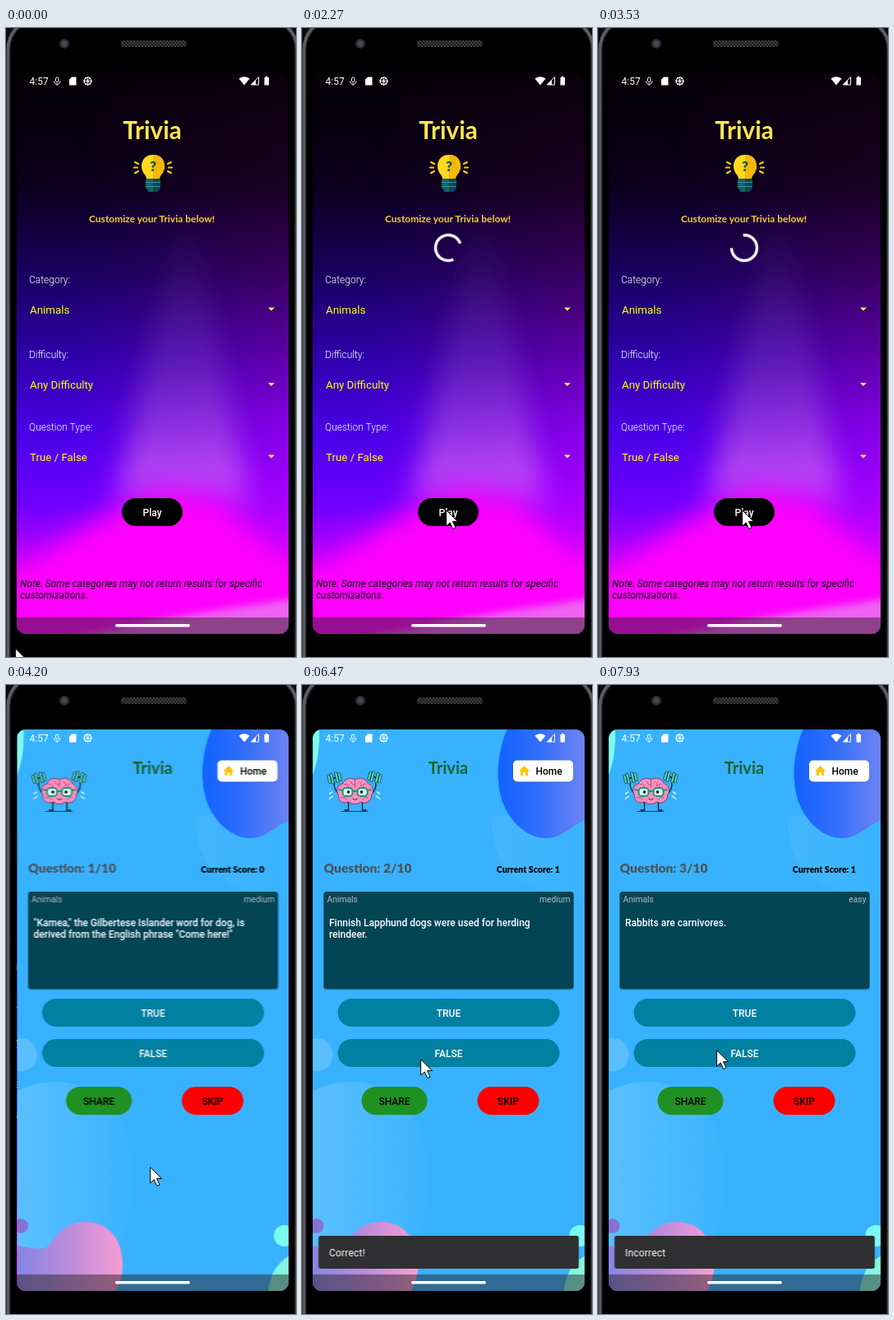
Write an HTML page that moves like this. It is 353 px wide and 764 px high and loops after 8 s.

```html
<!DOCTYPE html>
<html lang="en">
<head>
<meta charset="utf-8">
<title>Trivia</title>
<style>
html, body { margin: 0; width: 100%; height: 100%; overflow: hidden; background: #000; }
svg { display: block; width: 100vw; height: 100vh; }
text { font: 12px Roboto, sans-serif; fill: #fff; }
.fun { font-family: Lato, sans-serif; font-weight: 900; }
.label { font-weight: 300; }
.value { font-size: 13.3px; fill: #ff0; }
.note { font-style: italic; fill: #000; }
.btn { font-weight: 500; text-anchor: middle; }
.dark { fill: #000; }
.small { font-size: 10.3px; fill: #b3bcbf; }
.body { font-weight: 500; }
.end { text-anchor: end; }
.count { font-size: 15.5px; fill: #4b545b; }
.score { font-size: 10.6px; fill: #000; text-anchor: end; }

@property --a { syntax: "<number>"; inherits: true; initial-value: 0; }
@property --b { syntax: "<number>"; inherits: true; initial-value: 0; }

.anim { animation: 8s linear infinite; }
.step { animation: 8s step-end infinite; }

#cursor { animation-name: cursor; }
@keyframes cursor {
  0%, .875% { transform: translate(11px, 753px); animation-timing-function: ease-in-out; }
  4.125%, 10.875% { transform: translate(188px, 567px); animation-timing-function: ease-in-out; }
  15%, 56.6% { transform: translate(175px, 585px); animation-timing-function: ease-in-out; }
  61.6%, 80% { transform: translate(145px, 448px); }
  80.875%, 85% { transform: translate(144px, 454px); }
  86.2%, 100% { transform: translate(144px, 443px); }
}

/* page change: fast start, very slow finish */
#setup { animation-name: leave; }
@keyframes leave {
  0%, 48.625% { transform: none; animation-timing-function: cubic-bezier(.3, 0, .8, .15); }
  49.56% { transform: translateX(-13.2px); animation-timing-function: cubic-bezier(.05, .7, .1, 1); }
  54.25%, 100% { transform: translateX(-33px); }
}
#quiz { animation-name: enter, fade; }
@keyframes enter {
  0%, 48.625% { transform: translateX(33px); animation-timing-function: cubic-bezier(.3, 0, .8, .15); }
  49.56% { transform: translateX(19.8px); animation-timing-function: cubic-bezier(.05, .7, .1, 1); }
  54.25%, 100% { transform: none; }
}
@keyframes fade { 0%, 49.25% { opacity: 0; } 50.3%, 100% { opacity: 1; } }

/* spinner: the ring turns while head and tail chase each other */
#ring { transform-origin: 178px 267px; animation-name: turn; }
@keyframes turn {
  0%, 19.875% { transform: rotate(0deg); }
  44.125%, 100% { transform: rotate(445.2deg); }
}
#arc {
  fill: none; stroke: #fff; stroke-width: 3.4;
  stroke-dasharray: calc((var(--b) - var(--a) + 4) * 1px) calc((96 - var(--b) + var(--a)) * 1px);
  stroke-dashoffset: calc(var(--a) * -1px);
  animation-name: head, tail, spin;
}
@keyframes head {
  0%, 19.875% { --b: 0; animation-timing-function: cubic-bezier(.4, 0, .2, 1.04); }
  28.2% { --b: 72; animation-timing-function: cubic-bezier(.932, 0, .986, 1); }
  36.54% { --b: 75; animation-timing-function: cubic-bezier(.4, 0, .2, 1.04); }
  44.125%, 100% { --b: 147; }
}
@keyframes tail {
  0%, 28.2% { --a: 0; animation-timing-function: cubic-bezier(.4, 0, .2, 1); }
  36.54%, 100% { --a: 75; }
}
@keyframes spin {
  0% { opacity: 0; animation-timing-function: step-end; }
  19.875%, 100% { opacity: 1; }
}

.ripple { fill: #fff; transform-box: fill-box; transform-origin: center; }
#tapPlay { animation-name: tapPlay; }
@keyframes tapPlay {
  0%, 19.1% { opacity: 0; transform: scale(.3); }
  21.2%, 23.2% { opacity: .2; transform: none; }
  28.7%, 100% { opacity: 0; transform: none; }
}
#tapFalse { animation-name: tapFalse; }
@keyframes tapFalse {
  0%, 62.5% { opacity: 0; transform: scale(.1); }
  64%, 65% { opacity: .2; transform: none; }
  67.5% { opacity: 0; transform: none; }
  67.6%, 86.9% { opacity: 0; transform: scale(.1); }
  88.4%, 89.5% { opacity: .2; transform: none; }
  92%, 100% { opacity: 0; transform: none; }
}

#snack { transform-box: fill-box; transform-origin: center; animation-name: snack; }
@keyframes snack {
  0%, 68% { opacity: 0; transform: scale(.8); animation-timing-function: ease-out; }
  69.9%, 91.25% { opacity: 1; transform: none; }
  92.1% { opacity: 0; transform: none; }
  92.2% { opacity: 0; transform: scale(.8); animation-timing-function: ease-out; }
  94.06%, 100% { opacity: 1; transform: none; }
}

#q1 { animation-name: q1; }
#q2 { animation-name: q2; }
#q3 { animation-name: q3; }
#s0 { animation-name: s0; }
#s1 { animation-name: s1; }
#right { animation-name: right; }
#wrong { animation-name: wrong; }
@keyframes q1 { 0% { opacity: 1; } 73.4%, 100% { opacity: 0; } }
@keyframes q2 { 0% { opacity: 0; } 73.4% { opacity: 1; } 96.7%, 100% { opacity: 0; } }
@keyframes q3 { 0% { opacity: 0; } 96.7%, 100% { opacity: 1; } }
@keyframes s0 { 0% { opacity: 1; } 68%, 100% { opacity: 0; } }
@keyframes s1 { 0% { opacity: 0; } 68%, 100% { opacity: 1; } }
@keyframes right { 0% { opacity: 1; } 92.15%, 100% { opacity: 0; } }
@keyframes wrong { 0% { opacity: 0; } 92.15%, 100% { opacity: 1; } }
</style>
</head>
<body>
<svg viewBox="0 0 353 764" preserveAspectRatio="none">
<defs>
  <clipPath id="screen"><rect x="13" y="54" width="331" height="682" rx="11"/></clipPath>
  <clipPath id="playClip"><rect x="141" y="571" width="74" height="34" rx="17"/></clipPath>
  <clipPath id="falseClip"><rect x="44" y="430" width="270" height="34" rx="17"/></clipPath>
  <linearGradient id="west" x1="0" y1="0" x2="0" y2="1">
    <stop offset="0" stop-color="#050006"/><stop offset=".2" stop-color="#0a001c"/>
    <stop offset=".36" stop-color="#1a0060"/><stop offset=".5" stop-color="#2e00a8"/>
    <stop offset=".65" stop-color="#4c00ea"/><stop offset=".77" stop-color="#7000ff"/>
    <stop offset=".86" stop-color="#b800ff"/><stop offset=".93" stop-color="#f0f"/>
  </linearGradient>
  <linearGradient id="east" x1="0" y1="0" x2="0" y2="1">
    <stop offset="0" stop-color="#0c000b"/><stop offset=".2" stop-color="#1e0026"/>
    <stop offset=".36" stop-color="#3c0060"/><stop offset=".5" stop-color="#6400a6"/>
    <stop offset=".62" stop-color="#8c00e0"/><stop offset=".74" stop-color="#ac00ff"/>
    <stop offset=".86" stop-color="#d400ff"/><stop offset=".94" stop-color="#f0f"/>
  </linearGradient>
  <linearGradient id="across"><stop offset=".2" stop-color="#000"/><stop offset="1" stop-color="#fff"/></linearGradient>
  <mask id="toEast" maskUnits="userSpaceOnUse" x="13" y="54" width="370" height="682"><rect x="13" y="54" width="370" height="682" fill="url(#across)"/></mask>
  <linearGradient id="ray" x1="0" y1="0" x2="0" y2="1">
    <stop offset="0" stop-color="#5a3a90" stop-opacity="0"/><stop offset=".5" stop-color="#8048c8" stop-opacity=".35"/>
    <stop offset=".88" stop-color="#cc5cf4" stop-opacity=".75"/><stop offset="1" stop-color="#f030ff" stop-opacity=".3"/>
  </linearGradient>
  <filter id="soft" filterUnits="userSpaceOnUse" x="-60" y="150" width="480" height="700"><feGaussianBlur stdDeviation="15"/></filter>
  <filter id="haze" filterUnits="userSpaceOnUse" x="-60" y="600" width="480" height="250"><feGaussianBlur stdDeviation="5"/></filter>
  <linearGradient id="blue"><stop offset="0" stop-color="#1263ff"/><stop offset=".45" stop-color="#2f6dfc"/><stop offset="1" stop-color="#6f84f4"/></linearGradient>
  <linearGradient id="pink"><stop offset="0" stop-color="#8585e6"/><stop offset=".5" stop-color="#bd8cdc"/><stop offset="1" stop-color="#f79dd4"/></linearGradient>
  <linearGradient id="pale"><stop offset="0" stop-color="#66c4ff"/><stop offset="1" stop-color="#3cb4ff"/></linearGradient>
  <linearGradient id="mint"><stop offset="0" stop-color="#7cf7ec"/><stop offset="1" stop-color="#8af5d8"/></linearGradient>
  <pattern id="mesh" width="4" height="4" patternUnits="userSpaceOnUse"><path d="M0 0L4 4M4 0L0 4" stroke="#444449" stroke-width=".8"/></pattern>
  <path id="drop" d="M0 0H8L4 4Z" fill="#ffef5a"/>
  <g id="bell" stroke="#14383c" stroke-width=".8" fill="#52dcc8">
    <path d="M-6 0H6" stroke-width="2"/>
    <rect x="-8" y="-5" width="3" height="10" rx="1"/><rect x="-4.5" y="-6.5" width="3" height="13" rx="1"/>
    <rect x="1.5" y="-6.5" width="3" height="13" rx="1"/><rect x="5" y="-5" width="3" height="10" rx="1"/>
  </g>
</defs>

<!-- phone body -->
<rect width="353" height="764" fill="#0c0c0f"/>
<rect x="2.5" y="-12" width="351.500" height="830" rx="38" fill="#000" stroke="#5d5e64" stroke-width="4"/>
<rect x="5.200" y="-9" width="346.500" height="824" rx="35" fill="#000" stroke="#1c1d20" stroke-width="1.5"/>
<circle cx="71" cy="19" r="6" fill="#2b2c33"/><circle cx="71" cy="19" r="3.2" fill="#484a58"/>
<rect x="140" y="15" width="80" height="8" rx="3" fill="#1b1b1e"/><rect x="140" y="15" width="80" height="8" rx="3" fill="url(#mesh)"/>

<g clip-path="url(#screen)">
  <g id="setup" class="anim">
    <rect x="13" y="54" width="370" height="682" fill="url(#west)"/>
    <rect x="13" y="54" width="370" height="682" fill="url(#east)" mask="url(#toEast)"/>
    <path d="M212 220H226L300 590H130Z" fill="url(#ray)" filter="url(#soft)"/>
    <path d="M-30 690L110 598L195 562L260 574L330 640L400 680V790H-30Z" fill="#f0f" filter="url(#soft)"/>
    <path d="M70 742L200 716L370 690V742Z" fill="#e3a4ea" opacity=".6" filter="url(#haze)"/>
    <text class="fun" x="178" y="135" text-anchor="middle" style="font-size:29.5px;font-weight:700;fill:#ffe556">Trivia</text>
    <g>
      <path d="M157 163l4 2M156 169.500h4M157 176l4-2M201 163l-4 2M202 169.500h-4M201 176l-4-2" stroke="#ffd21f" stroke-width="2" stroke-linecap="round"/>
      <path d="M179 154c-9 0-14 6-14 14 0 8 6 10 6 15h16c0-5 6-7 6-15 0-8-5-14-14-14Z" fill="#ffd91f"/>
      <path d="M179 154c9 0 14 6 14 14 0 8-6 10-6 15h-8Z" fill="#f5b800"/>
      <path d="M170 183h18v11l-4 5h-10l-4-5Z" fill="#15616d"/><path d="M179 183h9v11l-4 5h-5Z" fill="#0c4552"/>
      <path d="M170 187.500h18M171 192.500h16" stroke="#3c93a0"/>
      <text class="fun" x="179" y="174" text-anchor="middle" style="font-size:17px;fill:#14505c">?</text>
    </g>
    <text class="fun" x="101" y="236" style="font-weight:700;fill:#ffcd2e">Customize your Trivia below!</text>
    <g id="ring" class="anim"><circle id="arc" class="anim" cx="178" cy="267" r="15.5" pathLength="100" transform="rotate(-90 178 267)"/></g>
    <text class="label" x="28" y="310">Category:</text><text class="value" x="29" y="346.500">Animals</text><use href="#drop" x="319" y="339.5"/>
    <text class="label" x="28" y="401">Difficulty:</text><text class="value" x="29" y="438">Any Difficulty</text><use href="#drop" x="319" y="431"/>
    <text class="label" x="28" y="489">Question Type:</text><text class="value" x="29" y="525.500">True / False</text><use href="#drop" x="319" y="518.5"/>
    <rect x="141" y="571" width="74" height="34" rx="17"/>
    <text class="btn" x="178" y="592.5">Play</text>
    <g clip-path="url(#playClip)"><circle id="tapPlay" class="ripple anim" cx="178" cy="588" r="40"/></g>
    <text class="note" x="17" y="679">Note: Some categories may not return results for specific</text>
    <text class="note" x="17" y="693">customizations.</text>
  </g>

  <g id="quiz" class="anim"><g transform="translate(-.5)">
    <rect x="13" y="54" width="370" height="682" fill="#38b2ff"/>
    <path d="M232 160C228 220 262 250 346 262V150Z" fill="url(#pale)" opacity=".25"/>
    <path d="M250 54C239 80 233 118 248 150C262 177 284 187 300 186C320 184 330 169 346 164V54Z" fill="url(#blue)"/>
    <path d="M13 54H21.5C22 76 20 92 13 111Z" fill="#80fbe8"/>
    <circle cx="18" cy="449" r="20" fill="#5bbfff"/>
    <path d="M13 494C45 476 90 478 118 503C150 530 160 580 150 640C146 680 120 700 100 736H13Z" fill="url(#pale)" opacity=".75"/>
    <circle cx="18" cy="657" r="9" fill="#8673d3"/>
    <path d="M13 681C32 684 45 688 53 680C62 666 74 652 97 652C124 652 142 674 142 703C142 718 138 728 133 737H13Z" fill="url(#pink)"/>
    <circle cx="339" cy="669" r="13" fill="#7dfaf0"/>
    <path d="M319 737C321 714 332 700 346 693V737Z" fill="url(#mint)"/>

    <!-- mascot -->
    <path d="M46 133C40 128 39 122 40 117M84 133C91 128 91 122 90 117" fill="none" stroke="#14383c" stroke-width="1.6"/>
    <use href="#bell" transform="translate(40 113) rotate(-14)"/><use href="#bell" transform="translate(89 112) rotate(14)"/>
    <path d="M57 142V152H52M74 142V152H79" fill="none" stroke="#222" stroke-width="1.5"/>
    <path d="M48 153.500H81" stroke="#1a3f60" stroke-width="1"/>
    <path d="M45 134C41 128 44 121 50 120C52 113 61 112 65 115C71 111 79 114 81 120C87 122 89 129 85 134C86 141 78 145 72 142C67 146 61 145 58 142C50 145 44 141 45 134Z" fill="#f58fbd" stroke="#7a2850" stroke-width=".8"/>
    <path d="M65 115V124M52 121q4-2 5 3M60 117q1 5 5 4M70 118q4 1 2 5M78 120q-4 0-3 4M48 137q5-2 7 3M81 137q-5-2-7 3" fill="none" stroke="#c0487f"/>
    <g fill="#d8fff4" stroke="#24907f" stroke-width="2"><rect x="50" y="125" width="12" height="10" rx="4"/><rect x="68" y="125" width="12" height="10" rx="4"/><path d="M62 129H68M50 128L45 127M80 128L85 127"/></g>
    <circle cx="57" cy="130" r="1.8"/><circle cx="73" cy="130" r="1.8"/>
    <path d="M62 138q3 3 6 0" fill="none" stroke="#5b1838"/>
    <path d="M37 130l-3 2M38 135l-4 3M92 130l3 2M91 135l4 3" stroke="#e5fbff" stroke-width="1.5" stroke-linecap="round"/>

    <text class="fun" x="178.500" y="108" text-anchor="middle" style="font-size:20px;font-weight:700;fill:#176329">Trivia</text>
    <rect x="257.500" y="92.500" width="73" height="26" rx="5" fill="#1d3f88" opacity=".45"/>
    <rect x="257.500" y="91.500" width="73" height="26" rx="5" fill="#fff"/>
    <path d="M264.500 104.500L271 98L277.500 104.500H275.500V110H272.500V106H269.500V110H266.500V104.500Z" fill="#ffc400"/>
    <text class="body dark" x="285" y="108.500">Home</text>

    <g id="s0" class="step"><text class="fun score" x="314.500" y="228">Current Score: 0</text></g>
    <g id="s1" class="step"><text class="fun score" x="314.500" y="228">Current Score: 1</text></g>
    <rect x="26.500" y="251" width="305" height="119.500" rx="4" fill="#12567a" opacity=".55"/>
    <rect x="27" y="251" width="304" height="118" rx="4" fill="#034455"/>
    <text class="small" x="31" y="263.500">Animals</text>
    <g id="q1" class="step">
      <text class="fun count" x="27" y="227.500">Question: 1/10</text>
      <text class="small end" x="327" y="263.500">medium</text>
      <text class="body" x="33.500" y="293">"Kamea," the Gilbertese Islander word for dog, is</text>
      <text class="body" x="33.500" y="307">derived from the English phrase "Come here!"</text>
    </g>
    <g id="q2" class="step">
      <text class="fun count" x="27" y="227.500">Question: 2/10</text>
      <text class="small end" x="327" y="263.500">medium</text>
      <text class="body" x="33.500" y="293">Finnish Lapphund dogs were used for herding</text>
      <text class="body" x="33.500" y="307">reindeer.</text>
    </g>
    <g id="q3" class="step">
      <text class="fun count" x="27" y="227.500">Question: 3/10</text>
      <text class="small end" x="327" y="263.500">easy</text>
      <text class="body" x="33.500" y="293">Rabbits are carnivores.</text>
    </g>

    <rect x="44" y="381" width="270" height="34" rx="17" fill="#0280a2"/><text class="btn" x="179" y="402.500">TRUE</text>
    <rect x="44" y="430" width="270" height="34" rx="17" fill="#0280a2"/><text class="btn" x="179" y="452">FALSE</text>
    <g clip-path="url(#falseClip)"><circle id="tapFalse" class="ripple anim" cx="179" cy="447" r="140"/></g>
    <rect x="73" y="488" width="80" height="34" rx="17" fill="#1f9022"/><text class="btn dark" x="113" y="509.500">SHARE</text>
    <rect x="214" y="488" width="75" height="34" rx="17" fill="#f00"/><text class="btn dark" x="251.500" y="509.500">SKIP</text>

    <g id="snack" class="anim">
      <rect x="20.500" y="669" width="317" height="40" rx="3" fill="#303033"/>
      <g id="right" class="step"><text x="33.500" y="693.500" letter-spacing=".2">Correct!</text></g>
      <g id="wrong" class="step"><text x="33.500" y="693.500" letter-spacing=".2">Incorrect</text></g>
    </g>
  </g></g>

  <!-- system bars -->
  <rect x="13" y="716" width="331" height="20" fill="#281e1e" opacity=".48"/>
  <rect x="133" y="724" width="91" height="3.600" rx="1.800" fill="#fff"/>
  <text x="28.500" y="69">4:57</text>
  <g fill="#fff">
    <rect x="60.500" y="60" width="3.400" height="6" rx="1.700" fill="none" stroke="#fff"/>
    <path d="M58.500 64.500c0 5 7.400 5 7.400 0M62.200 68v2" fill="none" stroke="#fff"/>
    <path d="M80 59.500h5.500v10h-8.500v-7Z"/>
    <circle cx="99.500" cy="64.500" r="4.300" fill="none" stroke="#fff" stroke-width="1.300"/>
    <path d="M94 64.500h11M99.500 59v11M96 60l7 9M103 60l-7 9" stroke="#fff" stroke-width=".8"/>
    <path d="M283.500 61.500q6.500-5 13 0L290 69.500Z"/>
    <path d="M298.500 69L307.500 59.500V69Z" fill="none" stroke="#fff"/><path d="M298.500 69L304 63V69Z"/>
    <path d="M314.500 60h1.500v-1.300h2.500V60h1.500v9.500h-5.500Z"/>
  </g>
</g>

<g id="cursor" class="anim"><path d="M.6 .8V20L5.200 15.800L8.800 23.500L12 22L8.500 14.500H14.500Z" fill="#fff" stroke="#000" stroke-linejoin="round"/></g>
</svg>
</body>
</html>
```
